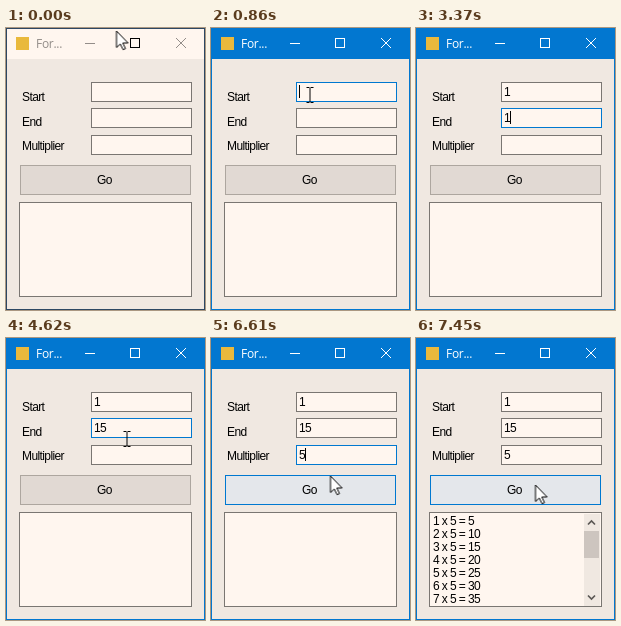
An HTML page that plays this animation: 199x282 px, repeating every 8000 ms.

```html
<!DOCTYPE html>
<html lang="en">
<head>
<meta charset="utf-8">
<title>Multiplication form</title>
<style>
html, body { margin: 0; width: 100%; height: 100%; overflow: hidden; background: #f0e8e1; }
svg { display: block; width: 199px; height: 282px; }
text { font: 12px "Liberation Sans", Arial, sans-serif; letter-spacing: -.6px; fill: #000; }
.title { font: 12px "Open Sans", "Noto Sans", sans-serif; letter-spacing: -.3px; }
rect, .glyph { shape-rendering: crispEdges; }
.field { fill: #fff6ef; stroke: #7a7672; }
.glyph { fill: none; stroke: #938d89; }
.active .glyph { stroke: #fff; }
.active text { fill: #fff; }

/* One loop is 8000 ms, so 1% is 80 ms */
.step { animation: 8s step-end infinite; }
.fade { animation: 8s linear infinite; }
.hide { opacity: 0; }

.active { animation-name: activate; }
@keyframes activate { 9.875% { opacity: 1; } }

.frame { fill: none; stroke: #2c4763; animation-name: frame; }
@keyframes frame { 9.875% { stroke: #0277d0; } }

.max { stroke: #000; stroke-width: 1.5; animation-name: leave; }
@keyframes leave { 4.875% { stroke: #938d89; stroke-width: 1; } }

.start { animation-name: start; }
@keyframes start {
  0%, 6.875% { stroke: #7a7672; }
  8.75%, 9.8% { stroke: #171614; }
  10.75%, 31.5% { stroke: #0078d0; }
  33.375%, 100% { stroke: #7a7672; }
}
.end { animation-name: end; }
@keyframes end {
  0%, 21.5% { stroke: #7a7672; }
  24.375%, 31.5% { stroke: #171614; }
  33.375%, 63.5% { stroke: #0078d0; }
  65.375%, 100% { stroke: #7a7672; }
}
.times { animation-name: times; }
@keyframes times {
  0%, 59.625% { stroke: #7a7672; }
  61.6%, 63.5% { stroke: #171614; }
  64.5%, 91.25% { stroke: #0078d0; }
  93.125%, 100% { stroke: #7a7672; }
}
.go { animation-name: go; }
@keyframes go {
  0%, 80.5% { fill: #e1d9d3; stroke: #ada69f; }
  82.625%, 91.24% { fill: #e4e7eb; stroke: #0078d0; }
  91.25%, 92.1% { fill: #ccdae7; stroke: #00539a; }
  93.125%, 100% { fill: #e4e7eb; stroke: #0078d0; }
}

.t1 { animation-name: t1; }
.t2 { animation-name: t2; }
.t3 { animation-name: t3; }
.t4 { animation-name: t4; }
.result { animation-name: result; }
@keyframes t1 { 19.5% { opacity: 1; } }
@keyframes t2 { 42.125% { opacity: 1; } }
@keyframes t3 { 50.5% { opacity: 1; } }
@keyframes t4 { 77.375% { opacity: 1; } }
@keyframes result { 92.125% { opacity: 1; } }

.caret { animation-name: caret; }
@keyframes caret {
  9.875% { opacity: 1; transform: translate(88px, 57px); }
  16.75% { opacity: 0; }
  19.5% { opacity: 1; transform: translate(94px, 57px); }
  26.5% { opacity: 0; }
  31.5% { opacity: 1; transform: translate(88px, 83px); }
  39% { opacity: 0; }
  42.125% { opacity: 1; transform: translate(94px, 83px); }
  48.375% { opacity: 0; }
  50.5% { opacity: 1; transform: translate(100px, 83px); }
  57.125% { opacity: 0; }
  63.5% { opacity: 1; transform: translate(88px, 110px); }
  70.375% { opacity: 0; }
  77.375% { opacity: 1; transform: translate(94px, 110px); }
  87.375% { opacity: 0; }
}

.arrow { animation-name: arrow; }
@keyframes arrow {
  0% { transform: translate(110.5px, 3px); }
  .875% { transform: translate(110.5px, 6px); }
  1.875% { transform: translate(110px, 11px); }
  2.875% { transform: translate(109px, 18px); }
  3.875% { transform: translate(107px, 26px); }
  4.875% { transform: translate(105px, 35px); }
  5.875% { transform: translate(103px, 45px); opacity: 1; }
  6.875% { transform: translate(121px, 128px); opacity: 0; }
  80.5% { transform: translate(121px, 128px); opacity: 1; }
  81.5% { transform: translate(120px, 133px); }
  82.5% { transform: translate(119.5px, 138px); }
  83.5% { transform: translate(119.5px, 142px); }
  84.5% { transform: translate(119.5px, 145px); }
  85.5% { transform: translate(119.5px, 147px); }
}

.beam { animation-name: beam; }
@keyframes beam {
  6.875% { opacity: 1; transform: translate(101.5px, 57px); }
  7.875% { transform: translate(99.5px, 64px); }
  8.75% { opacity: 1; transform: translate(98.5px, 67px); }
  19.5% { opacity: 0; transform: translate(98.5px, 67px); }
  20.5% { opacity: 1; transform: translate(103.5px, 72px); }
  21.5% { transform: translate(109.5px, 79px); }
  22.375% { transform: translate(114.5px, 85px); }
  23.375% { transform: translate(116.5px, 87px); }
  24.375% { opacity: 1; transform: translate(117.5px, 88px); }
  42.125% { opacity: 0; transform: translate(117.5px, 88px); }
  52.625% { opacity: 1; transform: translate(119.5px, 88px); }
  54.75% { transform: translate(119.5px, 89px); }
  55.75% { transform: translate(120.5px, 92px); }
  56.75% { transform: translate(120.5px, 96px); }
  57.625% { transform: translate(120.5px, 101px); }
  58.625% { transform: translate(121.5px, 106px); }
  59.625% { transform: translate(121.5px, 110px); }
  60.625% { transform: translate(121.5px, 113px); }
  61.625% { opacity: 1; transform: translate(121.5px, 114px); }
  77.375% { opacity: 0; transform: translate(121.5px, 114px); }
}
</style>
</head>
<body>
<svg viewBox="0 0 199 282">
  <rect width="199" height="282" fill="#f0e8e1"/>

  <g>
    <rect width="199" height="31" fill="#fff6ef"/>
    <text class="title" x="30" y="20" style="fill:#938d89">For...</text>
    <path class="glyph" d="M79 15.5h10M170 10l10 10m0-10l-10 10" style="shape-rendering:auto"/>
    <rect class="glyph max step" x="124.5" y="10.5" width="9" height="9"/>
  </g>
  <g class="active step hide">
    <rect width="199" height="31" fill="#0277d0"/>
    <text class="title" x="30" y="20">For...</text>
    <path class="glyph" d="M79 15.5h10M170 10l10 10m0-10l-10 10" style="shape-rendering:auto"/>
    <rect class="glyph" x="124.5" y="10.5" width="9" height="9"/>
  </g>
  <rect x="10" y="9" width="13" height="13" fill="#e9b93c"/>
  <rect class="frame step" x=".5" y=".5" width="198" height="281"/>

  <text x="16" y="73">Start</text>
  <text x="16" y="98">End</text>
  <text x="16" y="122">Multiplier</text>
  <rect class="field start fade" x="85.5" y="54.5" width="100" height="19"/>
  <rect class="field end fade" x="85.5" y="80.5" width="100" height="19"/>
  <rect class="field times fade" x="85.5" y="107.5" width="100" height="19"/>
  <text class="t1 step hide" x="88" y="68">1</text>
  <text class="t2 step hide" x="88" y="94">1</text>
  <text class="t3 step hide" x="94" y="94">5</text>
  <text class="t4 step hide" x="88" y="121">5</text>
  <rect class="caret step hide" width="1" height="13"/>

  <rect class="go fade" x="14.5" y="137.5" width="170" height="29"/>
  <text x="91" y="156">Go</text>

  <rect class="field" x="13.5" y="174.5" width="172" height="94"/>
  <g class="result step hide">
    <g id="rows"></g>
    <rect x="168" y="176" width="16" height="92" fill="#f0e8e1"/>
    <rect x="168" y="193" width="15" height="27" fill="#cdc5bf"/>
    <path d="M172 186.5l3.5-3.5 3.5 3.5M172 257.5l3.5 3.5 3.5-3.5" fill="none" stroke="#5c5855" stroke-width="1.7"/>
  </g>

  <g class="beam step hide">
    <rect x="-3.5" y="-8" width="3" height="1"/>
    <rect x=".5" y="-8" width="3" height="1"/>
    <rect x="-.5" y="-7" width="1" height="14"/>
    <rect x="-3.5" y="7" width="3" height="1"/>
    <rect x=".5" y="7" width="3" height="1"/>
  </g>
  <path class="arrow step" d="M0 0V16.5L3.8 13L6.6 18.7L9 17.6L6.3 12H11.6Z" fill="#fff" stroke="#000"/>
</svg>
<script>
const rows = document.getElementById('rows');
for (let n = 1; n <= 7; n++) {
  const row = document.createElementNS('http://www.w3.org/2000/svg', 'text');
  row.setAttribute('x', 17);
  row.setAttribute('y', 174 + 13 * n);
  row.textContent = `${n} x 5 = ${n * 5}`;
  rows.append(row);
}
</script>
</body>
</html>
```
